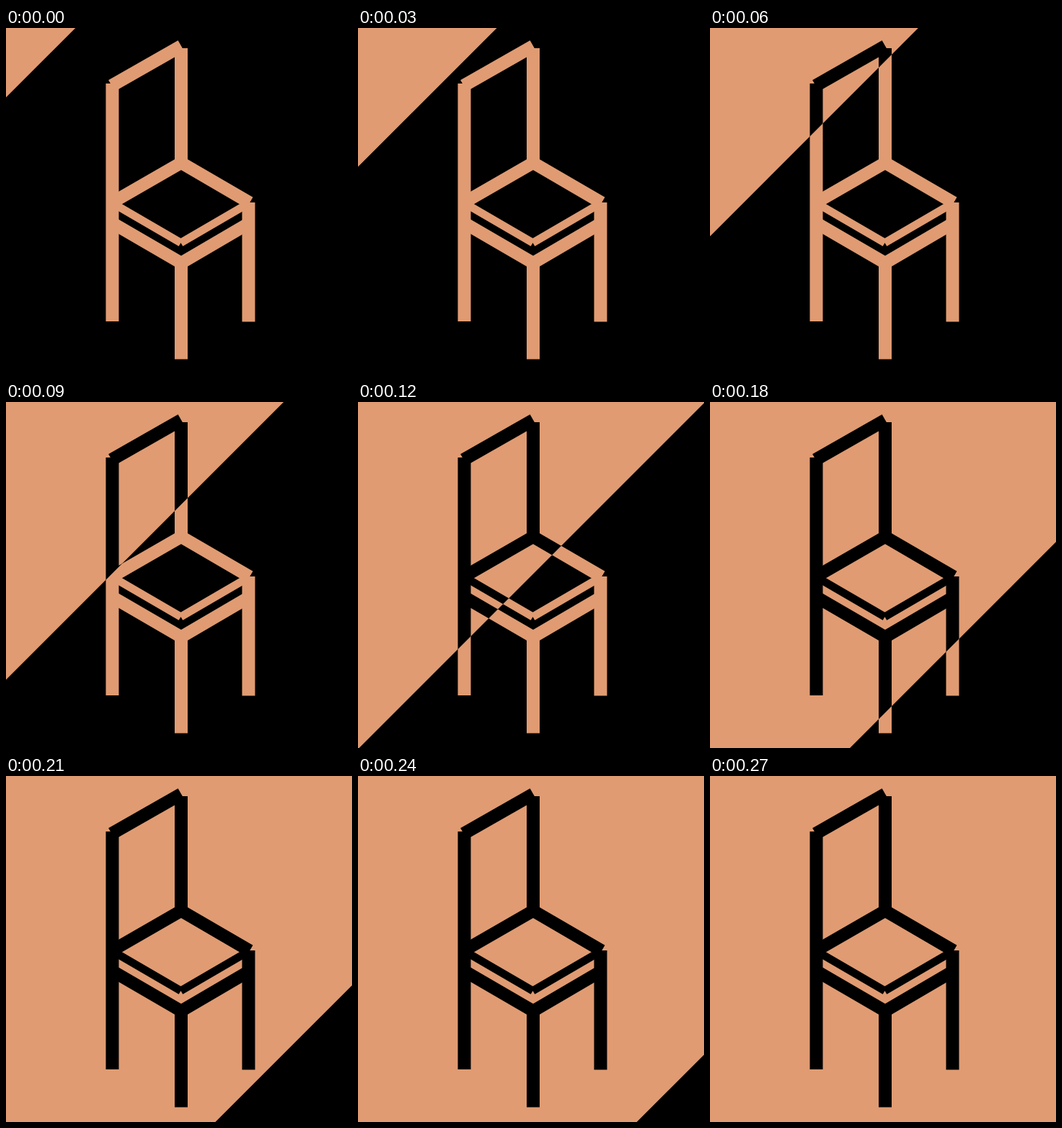
An HTML page that plays this animation: 480 by 480 pixels, repeating every 0.3 s.

```html
<!DOCTYPE html>
<html lang="en">
<head>
<meta charset="utf-8">
<title>Chair</title>
<style>
  html, body {
    margin: 0;
    height: 100%;
    overflow: hidden;
    background: #000;
  }

  svg {
    display: block;
    width: 100vw;
    height: 100vh;
    isolation: isolate;
  }

  .chair {
    fill: none;
    stroke: #e09b72;
    stroke-width: 17.5;
  }

  .chair .posts { stroke-width: 18; }
  .chair .rim { stroke-width: 11; }

  /* Same colour over itself turns black, over black it stays. */
  .sweep {
    fill: #e09b72;
    mix-blend-mode: difference;
    transform-origin: 0 0;
    animation: sweep 300ms steps(10, jump-none) infinite;
  }

  @keyframes sweep {
    from { transform: scale(1); }
    to { transform: scale(10); }
  }
</style>
</head>
<body>
<svg viewBox="0 0 480 480">
  <rect width="480" height="480"/>
  <g class="chair">
    <path class="posts" d="M147.5 77V407M243 28V188M243 326V459.5M336.5 242V407.5"/>
    <path class="posts" d="M146.6 80L243.1 25"/>
    <path d="M147.5 242L243 187M243 187L338.1 242.4"/>
    <path class="rim" d="M147.5 242.8L242.5 298M242.5 298L336.5 243.2"/>
    <path d="M147.5 270.5L243 326M243 326L336.5 271.2"/>
  </g>
  <path class="sweep" d="M0 0H96.3L0 96.3Z"/>
</svg>
</body>
</html>
```
